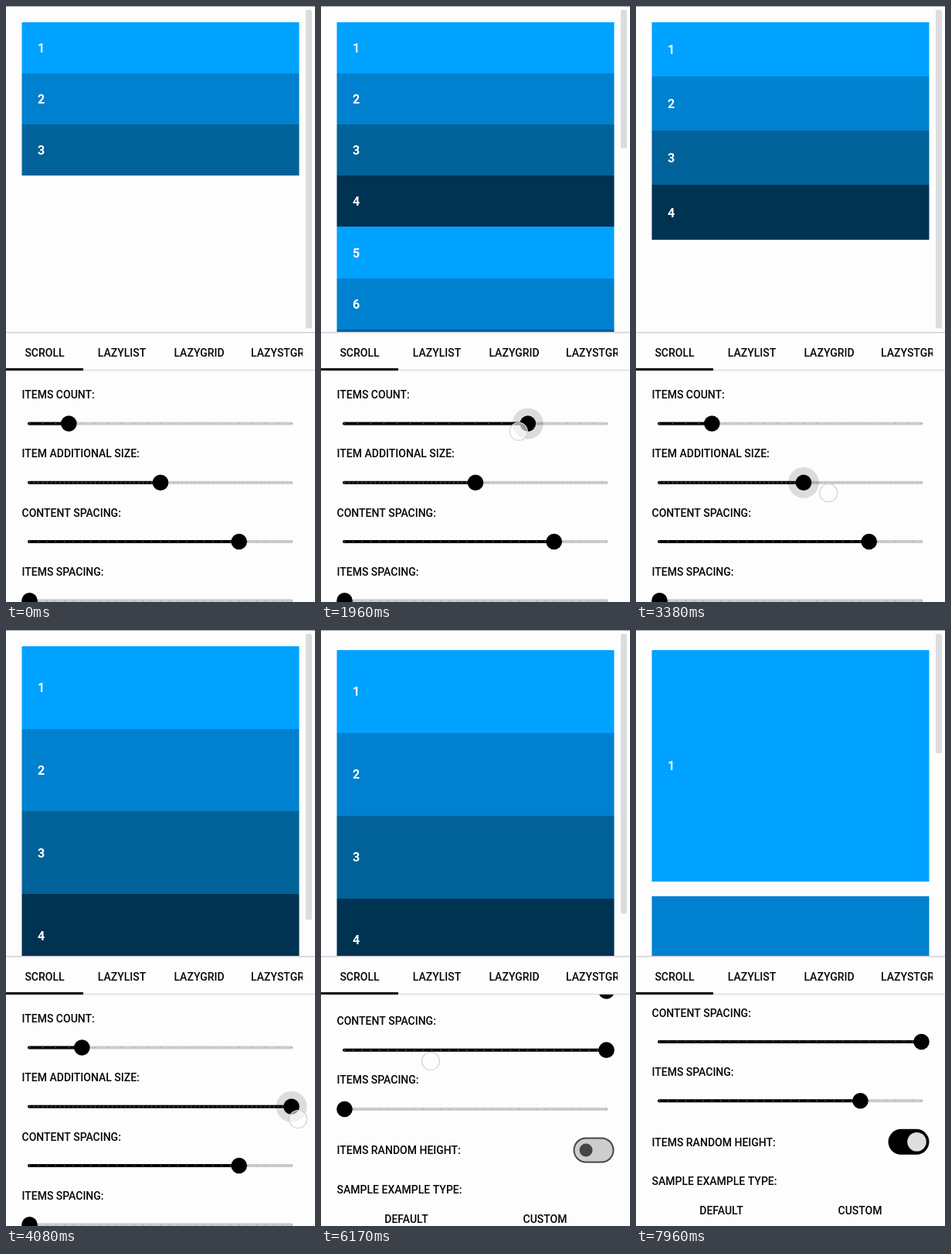
Animation of 400 by 770 pixels, one loop 8 s. Source, as an HTML page with a canvas:

```html
<!DOCTYPE html>
<html>
<head>
<meta charset="utf-8">
<style>
html, body { margin: 0; width: 100%; height: 100%; overflow: hidden; background: #fdfdfe; }
canvas { display: block; width: 400px; height: 770px; }
</style>
</head>
<body>
<canvas width="400" height="770"></canvas>
<script>
const ctx = document.querySelector('canvas').getContext('2d');
const LOOP = 8000, LAG = 100, BACK = '#fdfdfe', INK = '#050505';
const COLORS = ['#00a2ff', '#0081cf', '#006299', '#003352'];
const RANDOM_HEIGHTS = [299, 250, 213, 250];

// Touch gestures: time down, time up, then waypoints [time, x, y].
const touches = {
  count: { down: 100, up: 2640, path: [[100, 97, 546], [700, 240, 544], [1210, 106, 540], [1750, 306, 545], [2380, 114, 563]] },
  size: { down: 3000, up: 4220, path: [[3140, 209, 628], [3900, 378, 632]] },
  content: { down: 4630, up: 5680, path: [[4720, 312, 704], [5350, 385, 706]] },
  scroll: { down: 5960, up: 6230, path: [[5970, 142, 715], [6210, 142, 545]] },
  spacing: { down: 6480, up: 7400, path: [[6560, 43.5, 600], [7050, 303, 592]] },
  toggle: { down: 7580, up: 7690, path: [[7580, 354, 664]] }
};
const clamp = (v, a = 0, b = 1) => Math.min(b, Math.max(a, v));
const ease = u => u * u * (3 - 2 * u);
const ramp = (t, a, b) => ease(clamp((t - a) / (b - a)));

function pointAt({ path }, t) {
  let [, x, y] = path[0];
  for (let i = 1; i < path.length; i++) {
    const u = ramp(t, path[i - 1][0], path[i][0]);
    x += (path[i][1] - path[i - 1][1]) * u;
    y += (path[i][2] - path[i - 1][2]) * u;
  }
  return [x, y];
}
const held = (touch, t) => t >= touch.down && t < touch.up;

// Slider fraction, snapped to its steps; the thumb trails the finger.
function fraction(name, grip, steps, t) {
  const x = pointAt(touches[name], t - LAG)[0] - grip;
  return clamp(Math.round((x - 30.5) / 339 * steps) / steps);
}

function rect(x, y, w, h, color) {
  ctx.fillStyle = color;
  ctx.fillRect(x, y, w, h);
}
function pill(x, y, w, h, r, color) {
  ctx.beginPath();
  ctx.roundRect(x, y, w, h, r);
  ctx.fillStyle = color;
  ctx.fill();
}
function disc(x, y, r, color) {
  ctx.beginPath();
  ctx.arc(x, y, r, 0, 7);
  ctx.fillStyle = color;
  ctx.fill();
}
function text(str, x, y, align = 'left', color = INK, font = '500 14px') {
  ctx.font = font + ' Roboto, sans-serif';
  ctx.textAlign = align;
  ctx.fillStyle = color;
  ctx.fillText(str, x, y);
}
function clipped(x, y, w, h, draw) {
  ctx.save();
  ctx.beginPath();
  ctx.rect(x, y, w, h);
  ctx.clip();
  draw();
  ctx.restore();
}

function slider(label, y, f, steps, pressed) {
  const x = 30.5 + 339 * f, cy = y + 37.5;
  text(label, 20.5, y + 5);
  pill(28, cy - 2, 343.5, 4, 2, '#cbcbd0');
  pill(28, cy - 2, x - 28, 4, 2, INK);
  for (let i = 0; i <= steps; i++) {
    const tick = 30.5 + 339 * i / steps;
    disc(tick, cy, 0.8, tick < x ? '#707074' : '#a6a6aa');
  }
  if (pressed) disc(x, cy, 20, 'rgba(0,0,0,.13)');
  disc(x, cy, 10.3, '#000');
}

function toggle(y, on) {
  pill(326.5, y - 16.5, 53, 33, 16.5, on > 0.5 ? '#000' : '#444');
  if (on < 0.5) pill(328.5, y - 14.5, 49, 29, 14.5, '#cdcdce');
  disc(343 + 20.5 * on, y, 8.5 + 3.8 * on, on > 0.5 ? '#dededf' : '#444');
}

function list(count, height, pad, gap, random) {
  let y = pad;
  for (let i = 0; i < count; i++) {
    const h = random ? RANDOM_HEIGHTS[i % 4] : height;
    const top = Math.round(y);
    rect(20.5, top, 359, Math.round(y + h) - top, COLORS[i % 4]);
    text(i + 1, 41, y + h / 2 + 6, 'left', '#fff', '700 16px');
    y += h + gap;
  }
  const total = y - (count ? gap : 0) + pad;
  pill(388, 5, 8, 411.5 * Math.min(1, 421 / total), 2, '#dcdcdf');
}

function draw(t) {
  const count = fraction('count', 16, 20, t);
  const size = fraction('size', 9, 60, t);
  const content = fraction('content', 10, 30, t);
  const spacing = fraction('spacing', 13, 30, t);
  const scroll = 160 * ramp(t, 6000, 6203);
  const on = ramp(t, 7700, 7820);

  rect(0, 0, 400, 770, BACK);
  clipped(0, 0, 400, 421, () =>
    list(Math.round(count * 20), 25.5 + 81.4 * size, 0.2 + 25.6 * content, 25.6 * spacing, t >= 7700));
  rect(0, 0, 400, 1, '#a4a4a6');

  rect(0, 421, 400, 1.5, '#d2d2d8');
  clipped(16, 422, 368, 47, () => {
    ['SCROLL', 'LAZYLIST', 'LAZYGRID'].forEach((s, i) => text(s, 50 + 100 * i, 452.5, 'center'));
    text('LAZYSTGRID', 317, 452.5);
  });
  rect(0, 470, 400, 1, '#d4d4da');
  rect(0, 468, 100, 3, '#000');

  clipped(0, 471, 400, 299, () => {
    ctx.translate(0, -scroll);
    slider('ITEMS COUNT:', 502, count, 20, held(touches.count, t));
    slider('ITEM ADDITIONAL SIZE:', 578.3, size, 60, held(touches.size, t));
    slider('CONTENT SPACING:', 654.5, content, 30, held(touches.content, t));
    slider('ITEMS SPACING:', 730.8, spacing, 30, held(touches.spacing, t));
    text('ITEMS RANDOM HEIGHT:', 20.5, 826.5);
    toggle(821.3, on);
    text('SAMPLE EXAMPLE TYPE:', 20.5, 877);
    text('DEFAULT', 110.5, 915, 'center');
    text('CUSTOM', 290, 915, 'center');
  });

  for (const touch of Object.values(touches)) {
    if (!held(touch, t)) continue;
    disc(...pointAt(touch, t), 11.5, 'rgba(255,255,255,.6)');
    ctx.strokeStyle = '#cfcfd8';
    ctx.lineWidth = 1.2;
    ctx.stroke();
  }
}

function frame() {
  draw(performance.now() % LOOP);
  requestAnimationFrame(frame);
}
frame();
</script>
</body>
</html>
```
